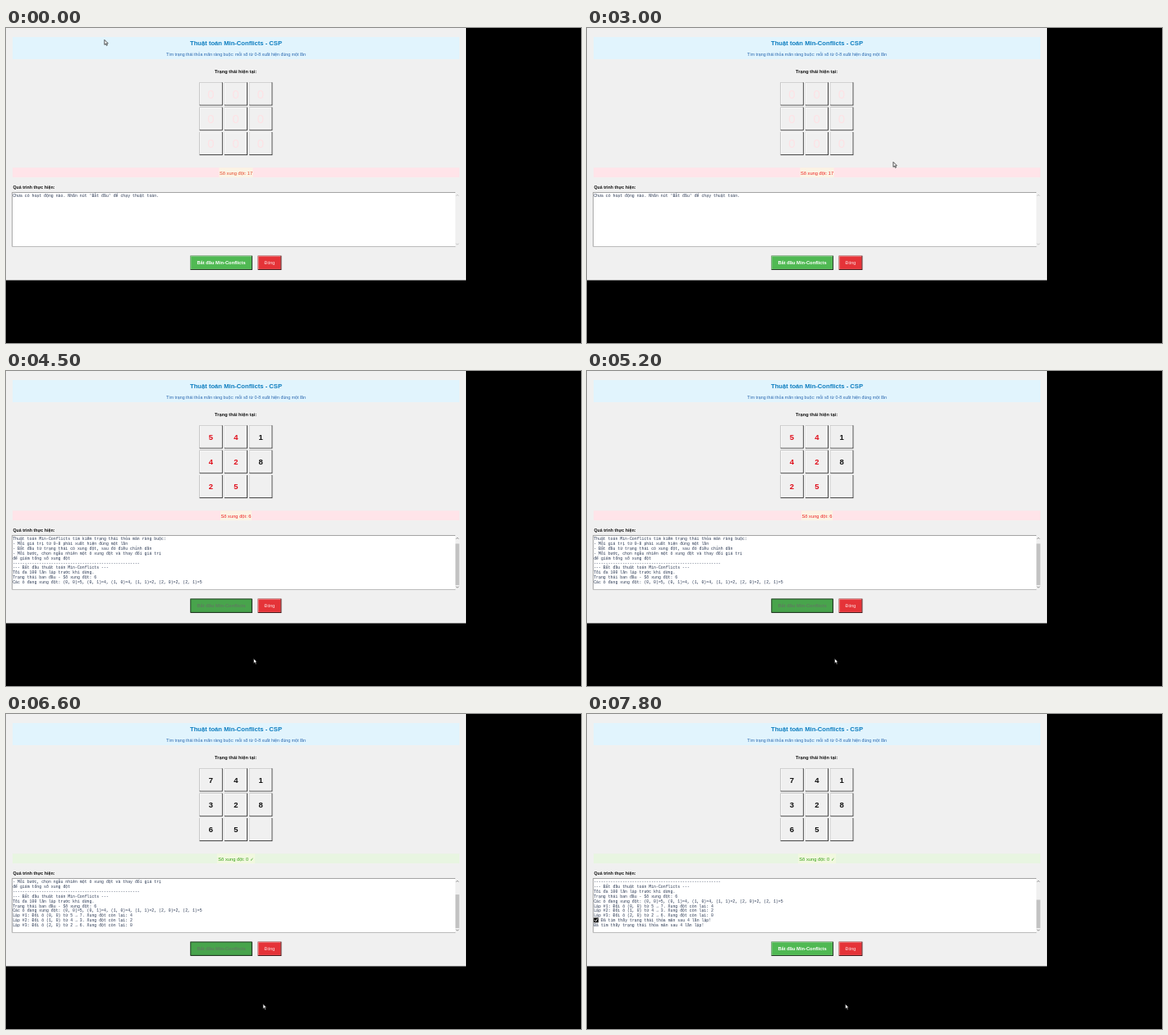
An HTML page with a canvas that plays this animation: 700x384 px, repeating every 8 s.

```html
<!DOCTYPE html>
<html lang="vi">
<head>
<meta charset="utf-8">
<title>Min-Conflicts</title>
<style>
html, body { margin: 0; width: 100%; height: 100%; overflow: hidden; background: #000; }
canvas { display: block; }
</style>
</head>
<body>
<canvas id="stage" width="700" height="384"></canvas>
<script>
const ctx = document.getElementById('stage').getContext('2d');
const LOOP = 8000, START = 4200, DONE = 7700;
const SANS = '"Liberation Sans", "DejaVu Sans", sans-serif';
const MONO = '"Liberation Mono", "DejaVu Sans Mono", monospace';
const FIRST = [5, 4, 1, 4, 2, 8, 2, 5, 0];
// time, cell, new value
const MOVES = [[5600, 0, 7], [6100, 3, 3], [6600, 6, 6]];
const INTRO = [
  'Thuật toán Min-Conflicts tìm kiếm trạng thái thỏa mãn ràng buộc:',
  '- Mỗi giá trị từ 0-8 phải xuất hiện đúng một lần',
  '- Bắt đầu từ trạng thái có xung đột, sau đó điều chỉnh dần',
  '- Mỗi bước, chọn ngẫu nhiên một ô xung đột và thay đổi giá trị',
  'để giảm tổng số xung đột',
  '-'.repeat(53),
  '--- Bắt đầu thuật toán Min-Conflicts ---',
  'Tối đa 100 lần lặp trước khi dừng.'
];
const FOUND = 'Đã tìm thấy trạng thái thỏa mãn sau 4 lần lặp!';
// pointer tip: time, x, y
const PATH = [
  [0, 119.5, 14], [100, 150, 24], [300, 330, 88], [500, 505, 150], [700, 575, 174],
  [900, 547, 161], [1000, 547, 161], [1100, 549.5, 161], [1200, 549.5, 161], [1300, 551, 161],
  [2800, 551, 161], [2900, 505, 166], [3100, 240, 160], [3300, 110, 144], [3400, 78, 160],
  [3500, 75, 190], [3600, 100, 232], [3700, 155, 266], [3800, 215, 286], [3900, 250, 302],
  [4100, 296.5, 339], [4500, 301, 350], [5500, 301, 350], [6100, 312.5, 353],
  [6900, 312.5, 353], [7000, 314, 353], [LOOP, 314, 353]
];

function rect(x, y, w, h, color) {
  ctx.fillStyle = color;
  ctx.fillRect(x, y, w, h);
}

// Large font drawn at a tenth keeps small text widths linear.
function text(str, x, y, size, color, { bold, mono, align = 'center' } = {}) {
  ctx.save();
  ctx.translate(x, y);
  ctx.scale(.1, .1);
  ctx.font = `${bold ? 'bold ' : ''}${size * 10}px ${mono ? MONO : SANS}`;
  ctx.textAlign = align;
  ctx.fillStyle = color;
  ctx.fillText(str, 0, 0);
  ctx.restore();
}

function raised(x, y, w, h, fill, light, dark) {
  rect(x, y, w, h, dark);
  rect(x, y, w - 1, h - 1, light);
  rect(x + 1, y + 1, w - 2.2, h - 2.2, fill);
}

function poly(points, fill, stroke, width) {
  ctx.beginPath();
  points.forEach(([x, y]) => ctx.lineTo(x, y));
  if (fill) { ctx.closePath(); ctx.fillStyle = fill; ctx.fill(); }
  if (stroke) { ctx.strokeStyle = stroke; ctx.lineWidth = width; ctx.stroke(); }
}

const inConflict = (cells, v) => cells.filter(c => c === v).length > 1;
const conflicts = cells => cells.filter(v => inConflict(cells, v)).length;

function solve(t) {
  const cells = [...FIRST];
  const clashes = cells.map((v, i) => inConflict(cells, v) && `(${i / 3 | 0}, ${i % 3})=${v}`).filter(Boolean);
  const log = [...INTRO, `Trạng thái ban đầu - Số xung đột: ${conflicts(cells)}`,
    `Các ô đang xung đột: ${clashes.join(', ')}`];
  MOVES.forEach(([at, i, value], n) => {
    if (t < at) return;
    const old = cells[i];
    cells[i] = value;
    log.push(`Lặp #${n + 1}: Đổi ô (${i / 3 | 0}, ${i % 3}) từ ${old} → ${value}. Xung đột còn lại: ${conflicts(cells)}`);
  });
  if (t >= DONE) log.push('✓' + FOUND, FOUND);
  return { cells, log };
}

function drawGrid(cells) {
  for (let i = 0; i < 9; i++) {
    const x = 235.6 + i % 3 * 30.3, y = 66.3 + (i / 3 | 0) * 30.3, v = cells && cells[i];
    raised(x, y, 28.2, 28.2, '#f0f0f0', '#fafafa', '#3c3c3c');
    if (!cells) text('0', x + 13.8, y + 19.4, 15, '#fde2e5');
    else if (v) text(v, x + 13.9, y + 17.5, 9.55, inConflict(cells, v) ? '#e00f1c' : '#111', { bold: true });
  }
}

function drawStatus(t, count) {
  const solved = count === 0;
  const half = solved ? 23 : count === 17 ? 20.5 : 19;
  rect(8, 170.3, 544, 11.8, solved ? '#e8f5e1' : '#ffe4e9');
  rect(280 - half, 170.3, half * 2, 11.8, solved ? '#f1f8df' : '#fbf3e4');
  text(`Số xung đột: ${count}${solved ? ' ✓' : ''}`, 280, 179, 5.74,
    solved ? '#38a018' : t < 2900 ? '#e5482c' : '#ee2424');
}

function drawLog(log, running) {
  rect(7.3, 200, 540.2, 66.6, '#8c8c8c');
  rect(8, 200.8, 539, 65.3, '#fff');
  rect(547, 200, 5, 66.6, '#f0f0f0');
  const first = Math.max(0, log.length - 10);
  log.slice(first).forEach((line, i) => {
    const y = 206.1 + i * 5.89, tick = line[0] === '✓';
    if (tick) {
      rect(8.2, y - 4.9, 5.8, 5.9, '#111');
      poly([[9.4, y - 2], [10.7, y - .4], [12.9, y - 3.8]], null, '#fff', .9);
    }
    text(tick ? line.slice(1) : line, tick ? 17 : 8.2, y, 4.86, '#26344f', { mono: true, align: 'left' });
  });
  if (running) {
    const top = 210.5 + first * 3.2;
    rect(547.2, top, 4.6, 261 - top, '#c2c2c2');
  }
  const arrow = running ? '#555' : '#aaa';
  poly([[548, 204.7], [549.5, 203.2], [551, 204.7]], null, arrow, .7);
  poly([[548, 262.7], [549.5, 264.2], [551, 262.7]], null, arrow, .7);
}

function drawButtons(disabled) {
  raised(224.4, 277.6, 75.6, 17.4, disabled ? '#48a44c' : '#50b953', disabled ? '#2c5a2e' : '#8fce90', '#263a27');
  text('Bắt đầu Min-Conflicts', 262, 288.2, 5.76, disabled ? '#5f7d60' : '#fff', { bold: true });
  raised(306.6, 277.6, 28.8, 17.4, '#e53338', '#ee8f90', '#46191b');
  text('Đóng', 320.9, 288, 5.26, '#ffe9e9');
}

function drawPointer(t) {
  const i = Math.max(1, PATH.findIndex(p => p[0] > t));
  const [t0, x0, y0] = PATH[i - 1], [t1, x1, y1] = PATH[i];
  const k = (t - t0) / (t1 - t0);
  const x = x0 + (x1 - x0) * k, y = y0 + (y1 - y0) * k;
  const shape = [[0, 0], [0, 6], [1.4, 4.8], [2.5, 7], [3.5, 6.5], [2.5, 4.4], [4.3, 4.3]];
  poly([...shape, shape[0]].map(([a, b]) => [x + .4 + a, y + .4 + b]), '#fff', '#111', .7);
}

function draw(t) {
  const running = t >= START;
  const { cells, log } = running ? solve(t)
    : { log: ["Chưa có hoạt động nào. Nhấn nút 'Bắt đầu' để chạy thuật toán."] };
  rect(0, 0, 700, 384, '#000');
  rect(0, 0, 560, 307.5, '#f0f0f0');
  rect(8, 11, 544, 27, '#e1f4fd');
  text('Thuật toán Min-Conflicts - CSP', 280, 20.8, 7.64, '#0b7cbf', { bold: true });
  text('Tìm trạng thái thỏa mãn ràng buộc: mỗi số từ 0-8 xuất hiện đúng một lần', 280, 33.6, 5.28, '#2a68b0');
  text('Trạng thái hiện tại:', 279.6, 55.2, 5.74, '#111', { bold: true });
  drawGrid(cells);
  drawStatus(t, cells ? conflicts(cells) : 17);
  text('Quá trình thực hiện:', 8.5, 196, 5.3, '#111', { bold: true, align: 'left' });
  drawLog(log, running);
  drawButtons(running && t < DONE);
  drawPointer(t);
}

const began = performance.now();
function tick() {
  const t = (performance.now() - began) % LOOP;
  draw(Math.floor(t / 100) * 100);
  requestAnimationFrame(tick);
}
tick();
</script>
</body>
</html>
```
